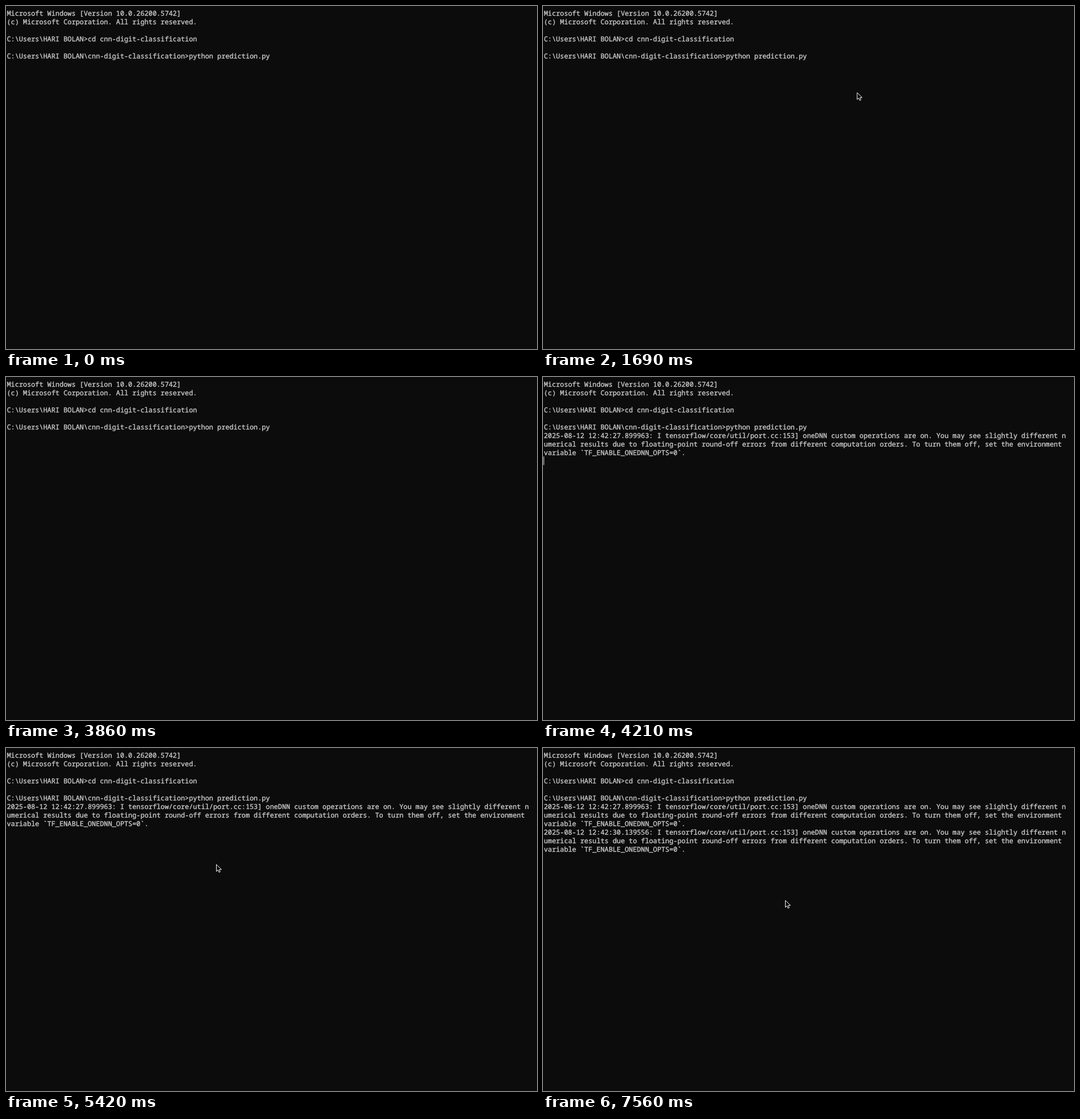
These frames come from a looping animation (930x602 px, 8 s). An HTML page:

```html
<!DOCTYPE html>
<html lang="en">
<head>
<meta charset="utf-8">
<title>Terminal</title>
<style>
  html, body { margin: 0; width: 100%; height: 100%; overflow: hidden; background: #0c0c0c; }
  svg { display: block; width: 930px; height: 602px; }
  text {
    font: 11.823px "Noto Sans Mono", "DejaVu Sans Mono", monospace;
    font-variant-ligatures: none;
    text-rendering: geometricPrecision;
    white-space: pre;
    fill: #ccc;
    stroke: #ccc;
    stroke-width: .35px;
  }
</style>
</head>
<body>
<svg viewBox="0 0 930 602">
  <g id="screen"></g>
  <rect id="caret" width="1" height="15" fill="#ddd"/>
  <path id="mouse" d="M.5 .5V12.6L3.3 10 5.1 14.2 7.2 13.3 5.4 9.2H9.4Z"
        fill="#000" stroke="#fff" stroke-linejoin="round"/>
</svg>
<script>
const LOOP = 8000, COLS = 129, CELL = 7.094, ROW = 15;
const ENTER = 2520, BLINK_START = 4360, BLINK = 530;
const $ = id => document.getElementById(id);
const home = 'C:\\Users\\HARI BOLAN';
const command = home + '\\cnn-digit-classification>python prediction.py';

const notice = stamp => {
  const s = `2025-08-12 12:42:${stamp}: I tensorflow/core/util/port.cc:153] ` +
    'oneDNN custom operations are on. You may see slightly different numerical results ' +
    'due to floating-point round-off errors from different computation orders. ' +
    'To turn them off, set the environment variable `TF_ENABLE_ONEDNN_OPTS=0`.';
  return [0, 1, 2].map(i => s.slice(i * COLS, (i + 1) * COLS));
};

const rows = [];
function print(start, lines) {
  for (const line of lines) {
    const el = document.createElementNS('http://www.w3.org/2000/svg', 'text');
    el.setAttribute('x', 1.5);
    el.setAttribute('y', 16.5 + rows.length * ROW);
    el.textContent = line;
    $('screen').append(el);
    rows.push({ el, start });
  }
}
print(0, [
  'Microsoft Windows [Version 10.0.26200.5742]',
  '(c) Microsoft Corporation. All rights reserved.',
  '',
  home + '>cd cnn-digit-classification',
  '',
  command
]);
print(4210, notice('27.899963'));
print(6360, notice('30.139556'));

// Pointer glides: start, end, x, y
const glides = [
  [380, 530, 760, 388],
  [910, 1090, 595.5, 269.5],
  [1420, 1800, 531, 103.5],
  [4300, 4360, 510, 96],
  [4360, 4800, 386, 126],
  [4800, 5040, 368, 204],
  [7160, 7400, 424, 267]
];

const within = (t, a, b) => t >= a && t < b;
const show = (el, on) => el.setAttribute('visibility', on ? 'visible' : 'hidden');

function drawCaret(t, shownRows) {
  const on = t < BLINK_START
    ? within(t, 2000, 3860) || t >= 4210
    : Math.floor((t - BLINK_START) / BLINK) % 2;
  const [col, row] = t < ENTER ? [command.length, shownRows - 1] : [0, shownRows];
  show($('caret'), on);
  $('caret').setAttribute('x', 1 + Math.round(col * CELL));
  $('caret').setAttribute('y', 4.5 + row * ROW);
}

function drawMouse(t) {
  let x = 866, y = 568;
  for (const [start, end, toX, toY] of glides) {
    // The pointer is refreshed every 30 ms
    const elapsed = t >= end ? end - start : Math.floor((t - start) / 30) * 30;
    const k = Math.max(0, elapsed / (end - start));
    x += (toX - x) * k;
    y += (toY - y) * k;
  }
  show($('mouse'), within(t, 380, 2490) || t >= 4370);
  $('mouse').setAttribute('transform', `translate(${x} ${y})`);
}

function draw(t) {
  const shown = rows.filter(r => t >= r.start);
  rows.forEach(r => show(r.el, shown.includes(r)));
  drawCaret(t, shown.length);
  drawMouse(t);
}

const begin = performance.now();
function tick() {
  draw((performance.now() - begin) % LOOP);
  requestAnimationFrame(tick);
}
tick();
</script>
</body>
</html>
```
